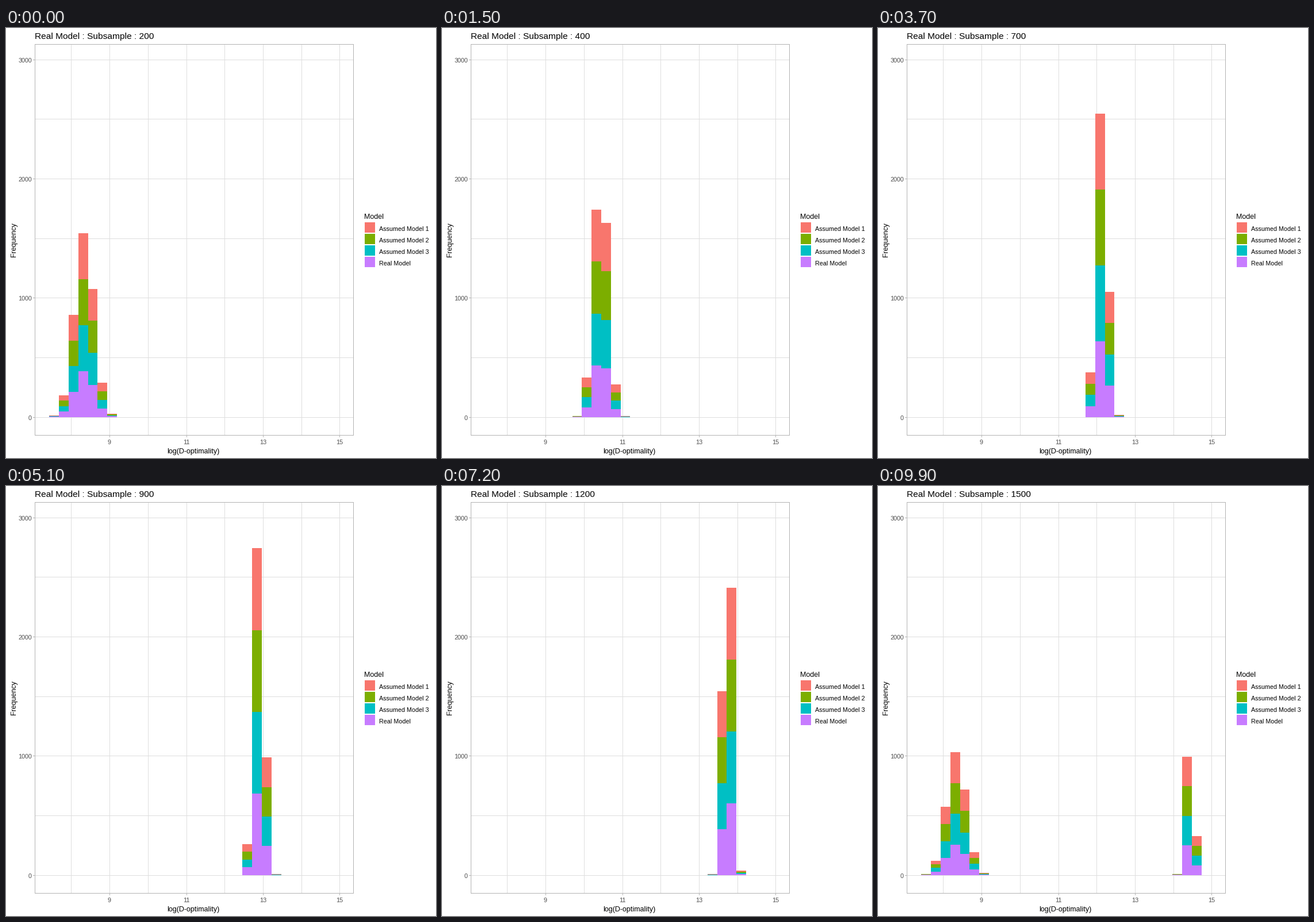
Write a matplotlib script that moves like this. It is 748 by 748 pixels and loops after 10000 ms.

```python
import math

import matplotlib.pyplot as plt
import numpy as np
from matplotlib.animation import FuncAnimation
from matplotlib.patches import Rectangle

SIZE, DPI = 748, 88
PX = 72 / DPI
FRAMES, INTERVAL = 100, 100
BINS, DRAWS = 30, 4000
BIN_LEFT, BIN_WIDTH = 75.4, 16.8
BASE_Y, UNIT_Y = 677, 0.2073
COLORS = ["#F8766D", "#7CAE00", "#00BFC4", "#C77CFF"]
LABELS = ["Assumed Model 1", "Assumed Model 2", "Assumed Model 3", "Real Model"]
GRID, BORDER, TICK_TEXT = "#DEDEDE", "#B3B3B3", "#4D4D4D"
LEFT, TOP, RIGHT, BOTTOM = 50, 28, 604, 708

# Centre and spread of the distribution, in bins, at a few sample sizes.
KEY_SIZES = [200, 300, 500, 700, 900, 1200, 1500]
KEY_MEANS = [3.62, 8.51, 14.64, 18.68, 21.69, 25.11, 27.78]
KEY_SPREADS = [0.983, 0.806, 0.628, 0.518, 0.457, 0.384, 0.321]


def bin_totals(n):
    """Expected bin counts of a normal sample whose shape follows log(n)."""
    mean, spread = (np.interp(math.log(n), np.log(KEY_SIZES), values)
                    for values in (KEY_MEANS, KEY_SPREADS))
    cdf = [math.erf((k - mean) / (spread * math.sqrt(2))) / 2
           for k in range(BINS + 1)]
    return DRAWS * np.diff(cdf)


SAMPLES = list(range(200, 1600, 100))
STATES = [bin_totals(n) for n in SAMPLES]
# Each state is reached on one of these frames; the last one closes the loop.
ARRIVALS = [round(FRAMES * i / len(SAMPLES) + 0.49) if i else 0
            for i in range(len(SAMPLES))] + [FRAMES]
STEPS = [4 if b - a > 7 or i == 0 else 3
         for i, (a, b) in enumerate(zip(ARRIVALS, ARRIVALS[1:]))]

plt.rcParams["font.family"] = "Liberation Sans"
fig = plt.figure(figsize=(SIZE / DPI, SIZE / DPI), dpi=DPI, facecolor="white")
ax = fig.add_axes([0, 0, 1, 1])
ax.set_xlim(0, SIZE)
ax.set_ylim(SIZE, 0)
ax.axis("off")


def text(x, y, label, size, color="black", **kw):
    return ax.text(x, y, label, fontsize=size * PX, color=color,
                   **{"va": "baseline", **kw})


def block(x, y, w, h, color, z):
    return ax.add_patch(Rectangle((x, y), w, h, facecolor=color, lw=0,
                                  antialiased=False, zorder=z))


def hline(y, x0, x1, color, z):
    block(x0, y, x1 - x0, 1, color, z)


def vline(x, y0, y1, color, z):
    block(x, y0, 1, y1 - y0, color, z)


# Grid: one line per unit of x and per 500 of y, every second one labelled.
for i in range(8):
    x = round(113.4 + 66.7 * i)
    vline(x, TOP, BOTTOM, GRID, 1)
    if i % 2:
        vline(x, BOTTOM, BOTTOM + 4, BORDER, 4)
        text(x, 724, str(8 + i), 10.8, TICK_TEXT, ha="center")
for i in range(7):
    y = int(677.3 - 103.67 * i)
    hline(y, LEFT, RIGHT, GRID, 1)
    if i % 2 == 0:
        hline(y, LEFT - 3, LEFT, BORDER, 4)
        text(45, y + 5, str(500 * i), 10.8, TICK_TEXT, ha="right")
for x in (LEFT, RIGHT):
    vline(x, TOP, BOTTOM + 1, BORDER, 5)
for y in (TOP, BOTTOM):
    hline(y, LEFT, RIGHT + 1, BORDER, 5)

title = text(50, 19, "", 15.5)
text(325.5, 740, "log(D-optimality)", 12.5, ha="center")
text(20.5, 368, "Frequency", 12.6, rotation=90, ha="right", va="center")
text(623, 332, "Model", 12.5)
for i, (label, color) in enumerate(zip(LABELS, COLORS)):
    block(624, 338 + 20 * i, 18, 18, color, 2)
    text(649, 353 + 20 * i, label, 10.8)

# Every layer reaches down to the base; lower layers cover those behind.
edges = [round(BIN_LEFT + BIN_WIDTH * k) for k in range(BINS + 1)]
bars = [[block(x0, BASE_Y, x1 - x0, 0, color, 2 + layer / 10)
         for layer, color in enumerate(COLORS)]
        for x0, x1 in zip(edges, edges[1:])]


def update(frame):
    i = max(j for j, start in enumerate(ARRIVALS[:-1]) if start <= frame)
    blend = max(0, frame - ARRIVALS[i + 1] + STEPS[i]) / STEPS[i]
    totals = (1 - blend) * STATES[i] + blend * STATES[(i + 1) % len(STATES)]
    title.set_text(f"Real Model : Subsample : {SAMPLES[i]}")
    for column, total in zip(bars, totals):
        for layer, bar in enumerate(column):
            height = round(total * (4 - layer) / 4 * UNIT_Y)
            bar.set_y(BASE_Y - height)
            bar.set_height(height)
            bar.set_visible(height > 0)
    return []


anim = FuncAnimation(fig, update, frames=FRAMES, interval=INTERVAL,
                     repeat=True, repeat_delay=0, blit=False)
plt.show()
```
